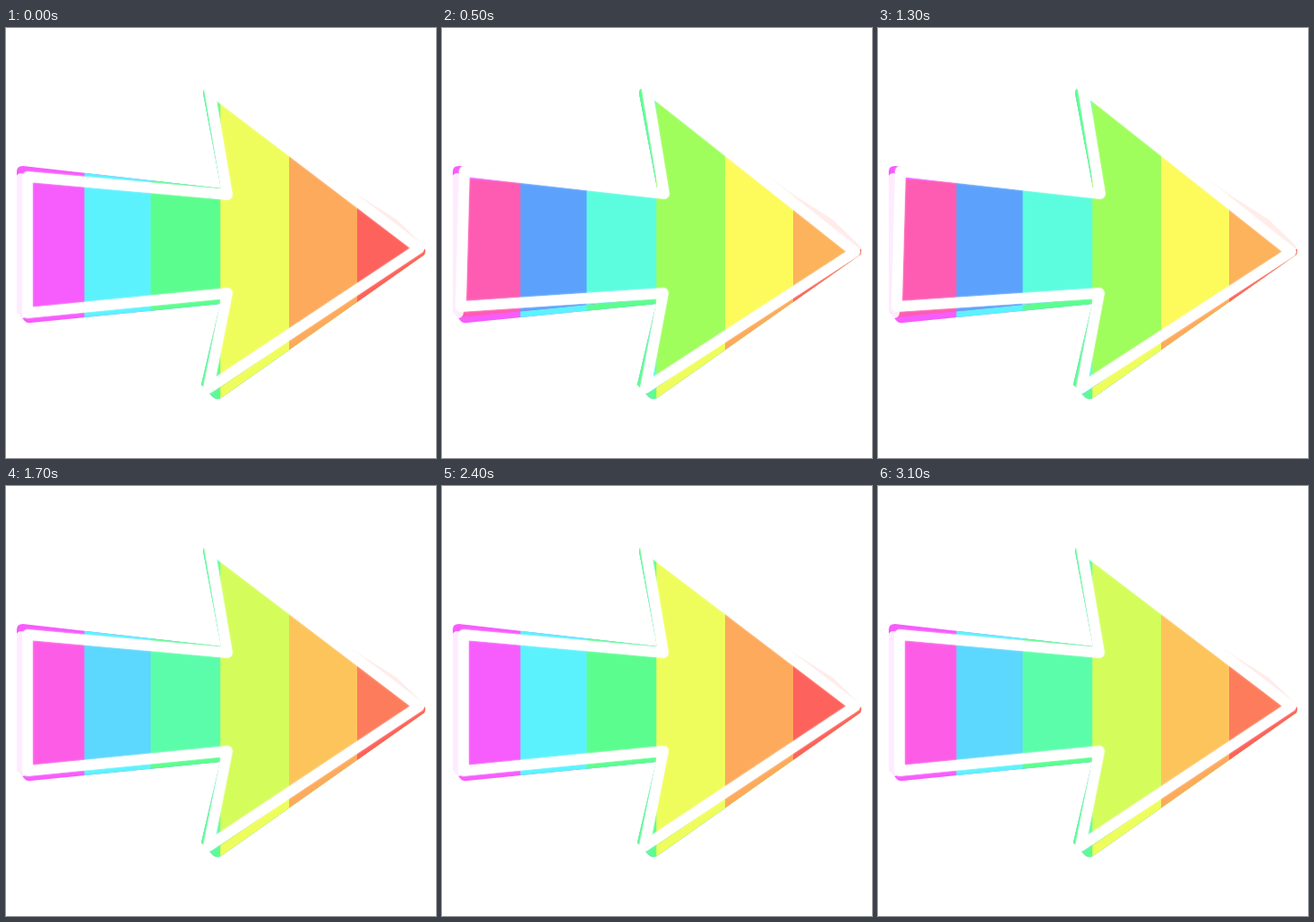
Recreate the animation shown at these times as an HTML page with a canvas. Size 480x480 px, loop 3.2 s.

```html
<!DOCTYPE html>
<html lang="en">
<head>
<meta charset="utf-8">
<title>Rainbow arrow</title>
<style>
  html, body { margin: 0; width: 100%; height: 100%; overflow: hidden; background: #fff; }
  canvas { display: block; width: 480px; height: 480px; }
</style>
</head>
<body>
<canvas id="stage" width="480" height="480"></canvas>
<script>
const ctx = document.getElementById('stage').getContext('2d');
const STEP_MS = 100, STEPS = 8;

// Stripes from tail to head: left edge and base hue.
const stripes = [[0, 298], [87.5, 184], [161.5, 139], [239.3, 65], [316, 29], [392, 2]];

const backShape = new Path2D(
  'M12 160Q12 154 19 154L240 179L220 73Q220 66 227 67L395 188L436 214L465 242Q470 248 467 253' +
  'L240 413Q234 416 230 411L218 398L239 308L28 329Q23 330 20 326L12 317Z');
const frontShape = new Path2D('M28 169L247 183L230 70L462 246L230 408L222 400L243 301L20 323Z');

// The chalk outline alternates between two drawings.
const outlines = [
  new Path2D('M24 166L247 186L227 68L461 246L226 402L247 296L24 318Z'),
  new Path2D('M25 160L248 185L228.5 66L461 250L227 402L247 296L21 311Z')
];
const haze = new Path2D('M17 168L18 318M228 66L395 192L436 220L464 242');

function fillStripes(shape, hueShift) {
  ctx.save();
  ctx.clip(shape);
  for (const [x, hue] of stripes) {
    ctx.fillStyle = `hsl(${hue + hueShift}, 97%, 67.6%)`;
    ctx.fillRect(x, 0, 480 - x, 480);
  }
  ctx.restore();
}

function chalk(path, width, alpha, softness) {
  ctx.save();
  ctx.lineJoin = ctx.lineCap = 'round';
  ctx.lineWidth = width;
  ctx.strokeStyle = `rgba(255, 255, 255, ${alpha})`;
  ctx.shadowColor = '#fff';
  ctx.shadowBlur = softness;
  ctx.stroke(path);
  ctx.restore();
}

function draw() {
  const step = Math.floor(performance.now() / STEP_MS) % STEPS;
  const hueShift = 10 * Math.min(step, STEPS - step);
  const outline = outlines[step === 4 || step === 5 ? 1 : 0];

  ctx.fillStyle = '#fff';
  ctx.fillRect(0, 0, 480, 480);
  fillStripes(backShape, 0);
  fillStripes(frontShape, hueShift);
  chalk(haze, 12, 0.88, 0);
  chalk(outline, 11.5, 0.98, 2);
  requestAnimationFrame(draw);
}
draw();
</script>
</body>
</html>
```
